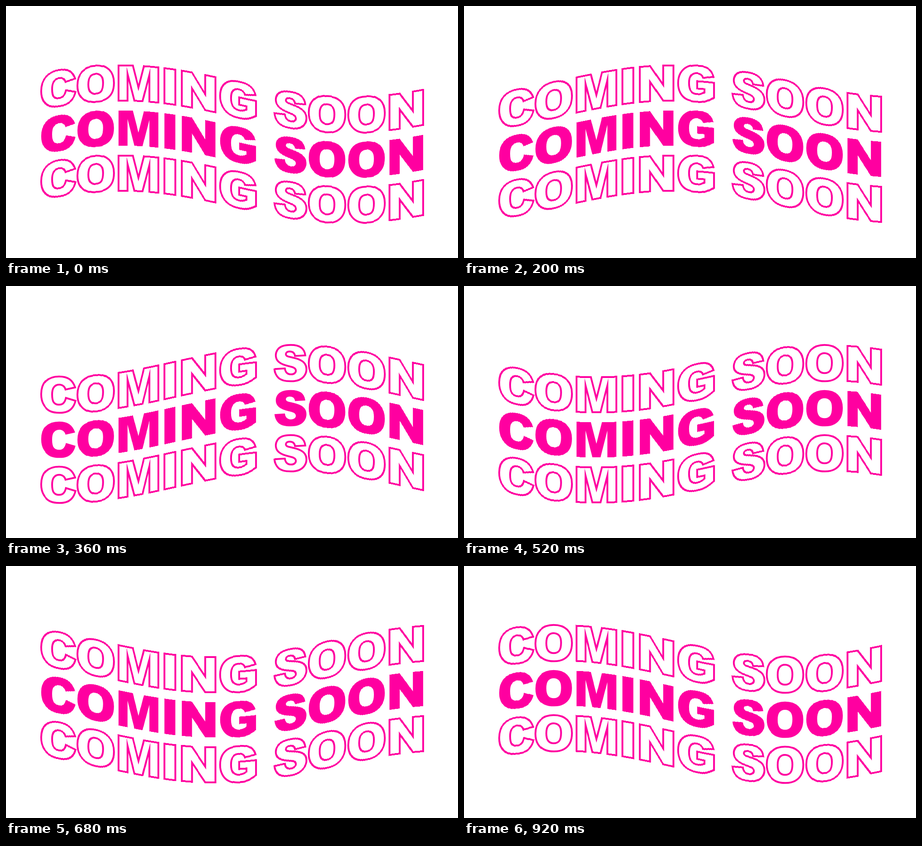
An HTML page with a canvas that plays this animation: 1000x559 px, repeating every 0.96 s.

```html
<!DOCTYPE html>
<html lang="en">
<head>
<meta charset="utf-8">
<title>Coming soon</title>
<style>
html, body { margin: 0; height: 100%; overflow: hidden; background: #fff; }
canvas { display: block; width: 100vw; height: 100vh; }
</style>
</head>
<body>
<canvas id="stage" width="1000" height="559" role="img" aria-label="COMING SOON COMING SOON COMING SOON"></canvas>
<script>
const W = 1000, H = 559, PINK = '#ff00a0';
const SCALE = 78 / 1466;            // cap height in px / font units
const PERIOD = 960, STEP = 40;      // ms
const AMP = 35.5, LENGTH = 1015, CREST = 251.5;

// Heavy grotesque capitals, y up from the baseline
const glyphs = {
  C: 'M1079 597L1476 477Q1436 310 1350 198T1137 30T812-25Q573-25 422 44T160 289T50 737Q50 1101 244 1296T791 1491Q1068 1491 1226 1379T1462 1035L1062 946Q1041 1013 1018 1044Q980 1096 925 1124T802 1152Q648 1152 566 1028Q504 936 504 739Q504 495 578 404T786 314Q916 314 982 387T1079 597Z',
  O: 'M87 732Q87 1091 287 1291T844 1491Q1210 1491 1408 1294T1606 744Q1606 487 1520 322T1270 66T862-25Q614-25 452 54T188 304T87 732ZM540 730Q540 508 622 411T847 314Q993 314 1073 409T1153 750Q1153 957 1070 1052T843 1148Q706 1148 623 1051T540 730Z',
  M: 'M150 1466H745L977 564L1207 1466H1806V0H1433V1118L1147 0H809L524 1118V0H150Z',
  I: 'M150 1466H604V0H150Z',
  N: 'M153 1466H575L1126 656V1466H1552V0H1126L578 804V0H153Z',
  G: 'M857 531V836H1557V211Q1356 74 1202 24T835-25Q574-25 410 64T154 329T64 733Q64 973 163 1150T453 1420Q602 1491 854 1491Q1097 1491 1218 1447T1418 1310T1537 1076L1100 998Q1073 1081 1008 1125T844 1169Q695 1169 606 1066T518 738Q518 500 608 398T857 296Q933 296 1002 318T1160 393V531Z',
  S: 'M74 485L505 512Q519 407 562 352Q632 263 762 263Q859 263 912 308T964 414Q964 471 914 516T682 601Q384 668 256 779T129 1062Q129 1175 194 1276T392 1434T752 1491Q1033 1491 1180 1386T1356 1054L929 1029Q912 1128 858 1173T707 1218Q628 1218 588 1184T548 1103Q548 1068 581 1040Q613 1011 733 986Q1030 922 1158 856T1346 694T1404 477Q1404 336 1326 217T1108 36T755-25Q381-25 237 119T74 485Z'
};
const text = 'COMINGSOON';
const origins = [75.2, 153.4, 241, 342.5, 380.8, 470.3, 590, 665.2, 752.6, 840.3];

const ctx = document.getElementById('stage').getContext('2d');
const flat = document.createElement('canvas');
flat.width = W;
flat.height = H;

function drawRow(c, baseline, filled) {
  [...text].forEach((ch, i) => {
    const path = new Path2D(glyphs[ch]);
    c.setTransform(SCALE, 0, 0, -SCALE, origins[i], baseline);
    if (filled) c.fill(path);
    else c.stroke(path);
  });
}

const pen = flat.getContext('2d');
pen.fillStyle = pen.strokeStyle = PINK;
pen.lineWidth = 4 / SCALE;
drawRow(pen, 245, false);
drawRow(pen, 345, true);
drawRow(pen, 445, false);

// Shift each pixel column along a travelling wave
function frame(now) {
  const t = Math.floor((now % PERIOD) / STEP) * STEP;
  ctx.fillStyle = '#fff';
  ctx.fillRect(0, 0, W, H);
  for (let x = 0; x < W; x++) {
    const phase = 2 * Math.PI * ((x - CREST) / LENGTH - t / PERIOD);
    const dy = Math.round(-AMP * Math.cos(phase));
    ctx.drawImage(flat, x, 0, 1, H, x, dy, 1, H);
  }
  requestAnimationFrame(frame);
}
frame(0);
</script>
</body>
</html>
```
